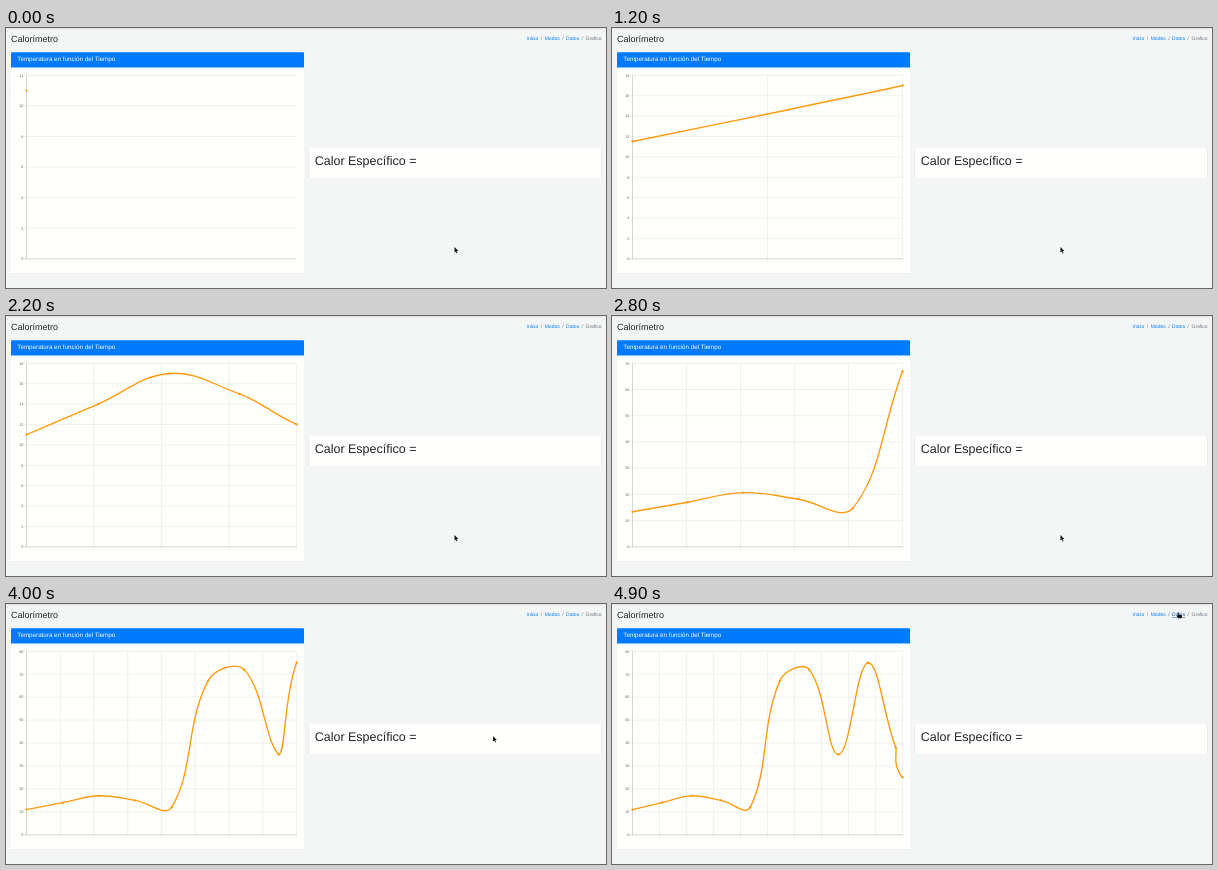
Write an HTML page that moves like this. It is 600 px wide and 260 px high and loops after 5000 ms.

```html
<!DOCTYPE html>
<html lang="es">
<head>
<meta charset="utf-8">
<title>Calorímetro</title>
<style>
  html, body { margin: 0; width: 100%; height: 100%; overflow: hidden; background: #f4f6f6; }
  svg { display: block; width: 600px; height: 260px; }
  text { font-family: "Liberation Sans", Arial, sans-serif; fill: #212529; text-rendering: geometricPrecision; white-space: pre; }
  .card { fill: #fffffe; filter: drop-shadow(0 .4px .6px rgba(0, 0, 0, .28)); }
  .crumbs text { font-size: 5px; fill: #6c757d; }
  .crumbs .link { fill: #007bff; }
  .crumbs .hover { fill: #0056b3; text-decoration: underline; }
  #grid path { fill: none; stroke: #000; stroke-opacity: .06; }
  #grid .axis { stroke-opacity: .16; }
  #grid text { font-size: 3.75px; fill: #666; text-anchor: end; }
  #line { fill: none; stroke: #ff9a0a; stroke-width: 1.35; stroke-linejoin: round; }
  #dots { fill: #ff9500; }
  #arrow, #hand { fill: #111; stroke: #fff; stroke-width: .5; paint-order: stroke; }
</style>
</head>
<body>
<svg viewBox="0 0 600 260">
  <rect width="600" height="260" fill="#f4f6f6"/>
  <rect width="600" height="1.2" fill="#e2e4e5"/>
  <text x="4.9" y="13.7" font-size="9">Calorímetro</text>
  <g class="crumbs">
    <text class="link" x="520.6" y="12.1">Inicio</text>
    <text x="534.8" y="12.1">/</text>
    <text class="link" x="538.7" y="12.1">Modos</text>
    <text x="556.2" y="12.1">/</text>
    <text class="link" id="datos" x="560.1" y="12.1">Datos</text>
    <text x="575.6" y="12.1">/</text>
    <text x="579.5" y="12.1">Grafico</text>
  </g>
  <rect class="card" x="5" y="24.2" width="293" height="221.6" rx="1.25"/>
  <path d="M5 39.4V25.45a1.25 1.25 0 0 1 1.25-1.25H296.75a1.25 1.25 0 0 1 1.25 1.25V39.4z" fill="#007bff"/>
  <text x="11.3" y="33.2" font-size="6.25" style="fill:#fff">Temperatura en función del Tiempo</text>
  <rect class="card" x="302.6" y="120" width="292.8" height="30" rx="1.25"/>
  <text x="308.7" y="136.9" font-size="12.5">Calor Específico =</text>
  <g id="grid"></g>
  <path id="line"/>
  <g id="dots"></g>
  <path id="arrow" d="M0 0V5.6L1.3 4.4 2.2 6.4 3 6 2.1 4.1 3.9 4z"/>
  <path id="hand" d="M0 0h1v2.2l3 .6 .4 .8 -.6 2.4h-3.2l-2-2.6 .6-.5 .8 .7z"/>
</svg>
<script>
const LOOP = 5000, STEP = 100, DURATION = 1000, TENSION = 0.4;
const VALUES = [11, 14, 17, 15, 12, 67, 72, 35, 75, 38, 25];
// Moment at which each value after the first arrives
const ARRIVALS = [320, 827, 1334, 1828, 2322, 2824, 3365, 3827, 4328, 4830];
const POINTER = [[3800, 448.5, 219], [3900, 457, 200], [4000, 487, 132],
                 [4200, 545, 40], [4400, 566, 9.5], [4900, 565.7, 8.3]];
const HOVER_AT = 4350;
const AREA = { left: 20.5, right: 290.6, top: 47.3, bottom: 230.8 };

const $ = id => document.getElementById(id);
const clamp = (v, lo, hi) => Math.min(hi, Math.max(lo, v));
const mix = (a, b, p) => a + (b - a) * p;
const easeOutQuart = t => 1 - (1 - t) ** 4;
const fix = v => v.toFixed(2);

function scaleOf(count) {
  const peak = Math.max(...VALUES.slice(0, count));
  const step = peak < 20 ? 2 : 10;
  return { step, max: Math.ceil(peak / step) * step };
}
const xAt = (i, count) => mix(AREA.left, AREA.right, count > 1 ? i / (count - 1) : 0);
const yAt = (value, max) => mix(AREA.bottom, AREA.top, value / max);

// Each point: [x, y, incoming control x, y, outgoing control x, y]
function layout(count) {
  const { max } = scaleOf(count);
  const pts = VALUES.slice(0, count).map((v, i) => [xAt(i, count), yAt(v, max)]);
  return pts.map((p, i) => {
    const a = pts[i - 1] || p, b = pts[i + 1] || p;
    const before = Math.hypot(p[0] - a[0], p[1] - a[1]);
    const after = Math.hypot(b[0] - p[0], b[1] - p[1]);
    const total = before + after || 1;
    const control = k => [
      clamp(p[0] + k * (b[0] - a[0]), AREA.left, AREA.right),
      clamp(p[1] + k * (b[1] - a[1]), AREA.top, AREA.bottom)
    ];
    return [...p, ...control(-TENSION * before / total), ...control(TENSION * after / total)];
  });
}

function poseOf(stage, time) {
  const p = easeOutQuart(clamp((time - stage.at) / DURATION, 0, 1));
  return stage.to.map((pt, i) =>
    stage.from[i] ? pt.map((v, k) => mix(stage.from[i][k], v, p)) : pt);
}

// Every arrival starts a new transition from wherever the last one had got to
const stages = [{ at: 0, from: [], to: layout(1) }];
ARRIVALS.forEach((at, i) =>
  stages.push({ at, from: poseOf(stages[i], at), to: layout(i + 2) }));

function gridMarkup(count) {
  const { step, max } = scaleOf(count);
  let out = "";
  for (let v = 0; v <= max; v += step) {
    const y = fix(yAt(v, max));
    out += `<path${v ? "" : ' class="axis"'} d="M17.4 ${y}H${AREA.right}"/>` +
           `<text x="17.3" y="${(+y + 1.3).toFixed(2)}">${v}</text>`;
  }
  for (let i = 0; i < count; i++) {
    out += `<path${i ? "" : ' class="axis"'} d="M${fix(xAt(i, count))} ${AREA.top}V${i ? 233.5 : 231}"/>`;
  }
  return out;
}

function pointerAt(time) {
  const next = POINTER.findIndex(k => k[0] > time);
  if (next === 0) return POINTER[0].slice(1);
  if (next < 0) return POINTER[POINTER.length - 1].slice(1);
  const a = POINTER[next - 1], b = POINTER[next];
  const p = (time - a[0]) / (b[0] - a[0]);
  return [mix(a[1], b[1], p), mix(a[2], b[2], p)];
}

let shownCount = 0;
function draw(time) {
  const stage = stages.filter(s => s.at <= time).pop();
  const pts = poseOf(stage, time);
  if (pts.length !== shownCount) {
    shownCount = pts.length;
    $("grid").innerHTML = gridMarkup(shownCount);
  }
  $("line").setAttribute("d", pts.map((p, i) => {
    const end = `${fix(p[0])} ${fix(p[1])}`;
    if (!i) return "M" + end;
    const q = pts[i - 1];
    return `C${fix(q[4])} ${fix(q[5])} ${fix(p[2])} ${fix(p[3])} ${end}`;
  }).join(""));
  $("dots").innerHTML = pts.map(p =>
    `<circle cx="${fix(p[0])}" cy="${fix(p[1])}" r="1.15"/>`).join("");

  const hover = time >= HOVER_AT;
  const [x, y] = pointerAt(time);
  for (const id of ["arrow", "hand"]) {
    $(id).setAttribute("transform", `translate(${fix(x)} ${fix(y)})`);
    $(id).style.display = (id === "hand") === hover ? "" : "none";
  }
  $("datos").classList.toggle("hover", hover);
}

const begin = performance.now();
function tick() {
  const time = (performance.now() - begin) % LOOP;
  draw(Math.floor(time / STEP) * STEP);
  requestAnimationFrame(tick);
}
tick();
</script>
</body>
</html>
```
